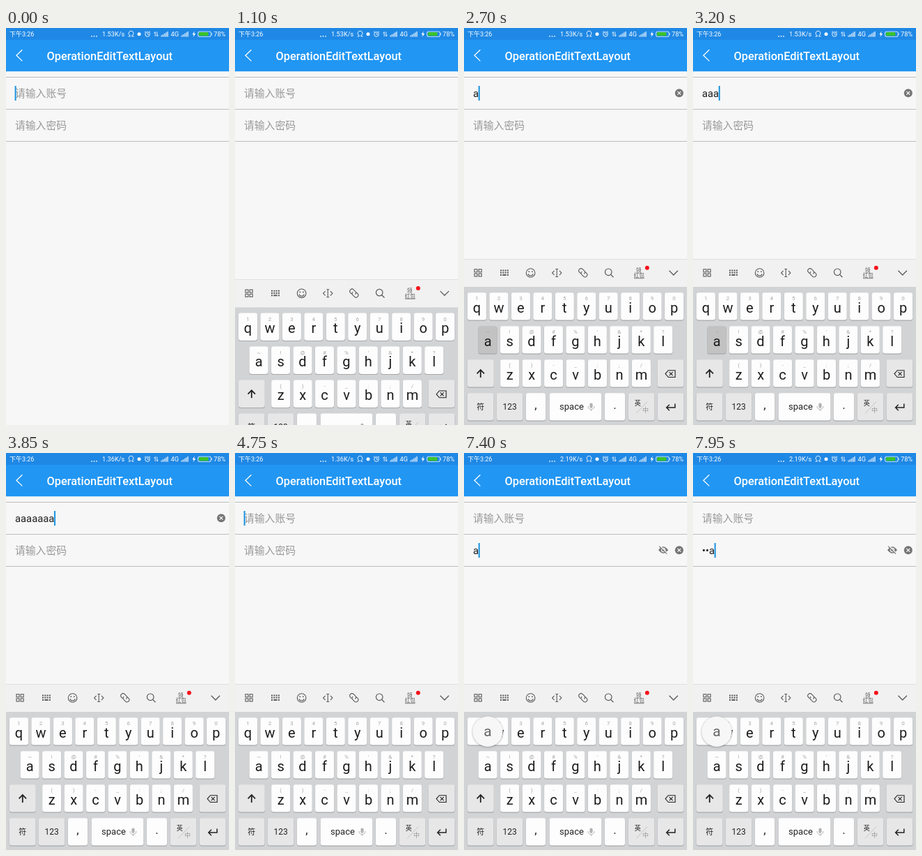
Animation, 320 px wide and 569 px high, one loop 8 s. Source, as an HTML page with a canvas:

```html
<!DOCTYPE html>
<html lang="zh">
<head>
<meta charset="utf-8">
<title>OperationEditTextLayout</title>
<style>
  html, body { margin: 0; width: 100%; height: 100%; overflow: hidden; background: #f7f7f7; }
  canvas { display: block; width: 320px; height: 569px; }
</style>
</head>
<body>
<canvas id="stage"></canvas>
<script>
const W = 320, H = 569, LOOP = 8000;
const canvas = document.getElementById('stage');
const ratio = window.devicePixelRatio || 1;
canvas.width = Math.round(W * ratio);
canvas.height = Math.round(H * ratio);
const ctx = canvas.getContext('2d');

const LATIN = 'Roboto, "Noto Sans CJK SC", "Noto Sans CJK", sans-serif';
const BLUE = '#2196f3', INK = '#222', ICON = '#5a5a5a';

// Timeline in ms
const accountTaps = [2500, 2750, 3000, 3250, 3400, 3600, 3750, 3950];
const passwordTaps = [7400, 7650, 7950];
const taps = [...accountTaps, ...passwordTaps];
const CLEARED = 4750, PASSWORD_FOCUS = 5500;
const cursorOn = [[0, 100], [600, 1100], [1600, 2100], [2500, 4500], [4750, 5300],
                  [5500, 6050], [6550, 7100], [7400, LOOP]];
const within = (t, from, to) => t >= from && t < to;
const countBefore = (times, t) => times.filter(time => time <= t).length;

function text(str, x, y, size, color, align = 'left', weight = 400) {
  ctx.font = `${weight} ${size}px ${LATIN}`;
  ctx.textAlign = align;
  ctx.fillStyle = color;
  ctx.fillText(str, x, y);
}

function rect(x, y, w, h, color) {
  ctx.fillStyle = color;
  ctx.fillRect(x, y, w, h);
}

function rounded(x, y, w, h, r, color) {
  ctx.beginPath();
  ctx.roundRect(x, y, w, h, r);
  ctx.fillStyle = color;
  ctx.fill();
}

function disc(x, y, r, color) {
  ctx.beginPath();
  ctx.arc(x, y, r, 0, 7);
  ctx.fillStyle = color;
  ctx.fill();
}

function stroke(path, color, width = 1) {
  ctx.strokeStyle = color;
  ctx.lineWidth = width;
  ctx.stroke(new Path2D(path));
}

const fill = (path, color) => {
  ctx.fillStyle = color;
  ctx.fill(new Path2D(path));
};

const ring = (x, y, r, color, width = 1) =>
  stroke(`M${x - r} ${y}a${r} ${r} 0 1 0 ${2 * r} 0a${r} ${r} 0 1 0 ${-2 * r} 0`, color, width);

function signal(x) {
  for (let i = 0; i < 5; i++) rect(x + i * 2.2, 10.6 - i * 1.4, 1.3, 2 + i * 1.4, '#e6f2fd');
}

function drawHeader(t) {
  rect(0, 0, W, 62.2, BLUE);
  rect(0, 0, W, 17, '#1f88e5');
  const speed = t < 3500 ? '1.53' : t < 7100 ? '1.36' : '2.19';
  text('下午3:26', 5, 12.3, 9, '#fff');
  for (const x of [123, 126.5, 130]) disc(x, 11.8, 0.9, '#fff');
  text(speed + 'K/s', 138, 12.3, 9.2, '#fff');
  stroke('M175.5 12H178.2V10.8A3.4 3.4 0 1 1 180.8 10.8V12H183.5', '#fff', 0.9);
  disc(191, 8.7, 2.5, '#fff');
  ring(203, 9, 3.3, '#fff', 0.9);
  stroke('M203 7V9.2H205M198.8 6.2L200.8 4.7M207.2 6.2L205.2 4.7', '#fff', 0.8);
  stroke('M214.2 12V5.5L212.4 7.6M216.8 5.5V12L218.6 9.9', '#fff', 0.9);
  signal(222.5);
  text('4G', 236.5, 12.3, 9.2, '#fff');
  signal(251.5);
  fill('M270.8 4.5L267.3 9.2H269.4L268.4 13L272.2 8H269.9Z', '#fff');
  rounded(275.2, 4.7, 19.4, 8, 2.8, '#e4f2fd');
  rounded(276, 5.5, 17.8, 6.4, 2.2, '#1f88e5');
  rounded(276.8, 6.1, 13.6, 5.2, 1.6, '#3cc22c');
  rect(294.6, 7.2, 0.9, 3, '#e4f2fd');
  text('78%', 298, 12.3, 9.2, '#fff');
  stroke('M23.4 31.2L15 39.3L23.4 47.4', '#fff', 1.3);
  text('OperationEditTextLayout', 58.5, 45.5, 16.35, '#fff', 'left', 500);
}

function drawClear(y) {
  disc(308.8, y, 6, '#757575');
  stroke(`M306.4 ${y - 2.4}l4.8 4.8m0 -4.8l-4.8 4.8`, '#fff', 1.2);
}

function drawHiddenEye(y) {
  ctx.save();
  ctx.translate(286, y);
  fill('M-7 0Q0 -9.4 7 0Q0 9.4 -7 0Z', '#777');
  disc(0, 0, 3.2, '#f7f7f7');
  disc(0, 0, 2, '#777');
  stroke('M-5 -6L6 5', '#f7f7f7', 1.6);
  stroke('M-6 -5.4L5.2 5.6', '#777', 1.2);
  ctx.restore();
}

function drawField(top, hint, value, cursor) {
  const baseline = top + 28.6;
  if (value) text(value, 13, baseline, 14.8, INK);
  else text(hint, 13, baseline + 0.6, 14.8, '#999');
  if (!cursor) return;
  ctx.font = `400 14.8px ${LATIN}`;
  rect(12.6 + ctx.measureText(value).width, top + 13, 2.1, 21, '#2196e0');
}

function drawForm(t) {
  for (const y of [70, 116, 162]) rect(0, y, W, 1, '#bdbdbd');
  const blink = cursorOn.some(([from, to]) => within(t, from, to));
  const account = t < CLEARED ? 'a'.repeat(countBefore(accountTaps, t)) : '';
  const typed = countBefore(passwordTaps, t);
  const password = typed ? '•'.repeat(typed - 1) + 'a' : '';
  drawField(70, '请输入账号', account, blink && t < PASSWORD_FOCUS);
  drawField(116, '请输入密码', password, blink && t >= PASSWORD_FOCUS);
  if (account) drawClear(93.3);
  if (password) {
    drawHiddenEye(139);
    drawClear(139.2);
  }
}

function drawTools() {
  rect(0, 331, W, 40, '#f1f1f1');
  rect(0, 331, W, 0.8, '#dcdcdc');
  ctx.strokeStyle = ICON;
  ctx.lineWidth = 1.1;
  for (const x of [15, 21.2])
    for (const y of [345.8, 352]) ctx.strokeRect(x, y, 4, 4);
  for (let row = 0; row < 2; row++)
    for (let col = 0; col < 4; col++) rect(52 + col * 3.3, 346.5 + row * 3.2, 2, 2, ICON);
  rect(52, 353, 2, 2, ICON);
  rect(55.3, 353, 5.3, 2, ICON);
  rect(61.9, 353, 2, 2, ICON);
  ring(95.6, 351, 6.3, ICON, 1.1);
  disc(93.3, 349.2, 0.9, ICON);
  disc(97.9, 349.2, 0.9, ICON);
  stroke('M92.1 352.3a3.6 3.6 0 0 0 7 0', ICON, 1.1);
  stroke('M129.6 347.8L126.6 351L129.6 354.2M136.9 347.8L139.9 351L136.9 354.2'
    + 'M133.2 345.5V356.5M131.3 345.5H135.2M131.3 356.5H135.2', ICON, 1.1);
  ctx.save();
  ctx.translate(170.8, 350.8);
  ctx.rotate(Math.PI / 4);
  for (let half = 0; half < 2; half++) {
    stroke('M-1.6 3.2H-4a3.2 3.2 0 0 1 0 -6.4H-0.8a3.2 3.2 0 0 1 3.2 3.2', ICON, 1.1);
    ctx.rotate(Math.PI);
  }
  ctx.restore();
  ring(207.2, 349.8, 4.8, ICON, 1.2);
  stroke('M210.6 353.4L214.4 357.2', ICON, 1.3);
  text('领', 250.5, 350, 8, ICON, 'center');
  text('红包', 251.3, 357.3, 7.5, ICON, 'center');
  rect(244, 358.4, 14.5, 0.8, ICON);
  disc(262.8, 343.8, 3, '#f5131a');
  stroke('M294.5 347.8L300.7 354L306.9 347.8', ICON, 1.3);
}

function drawKey(x, y, w, color = '#fdfdfd') {
  rounded(x - 0.2, y + 0.4, w + 0.4, 40, 3.5, '#a8a9ab');
  rounded(x, y, w, 39.3, 3.3, color);
}

function drawLetters(letters, marks, left, top, pressed) {
  [...letters].forEach((letter, i) => {
    const x = left + i * 31.45;
    const down = letter === 'a' && pressed;
    drawKey(x, top, 27, down ? '#c2c2c2' : undefined);
    text(marks[i], x + 13.5, top + 11, 8, '#a8a8a8', 'center');
    text(letter, x + 13.5, top + 28.6, 20, '#1c1c1c', 'center');
  });
}

function drawFunctionKeys() {
  const soft = '#e7e7e8';
  drawKey(5, 475.3, 37.8, soft);
  stroke('M23.8 501V490.5M18.6 495.4L23.8 490L29 495.4', INK, 1.8);
  drawKey(277.5, 475.3, 37.8, soft);
  stroke('M293.2 490.7H303V500.5H293.2L289 495.6Z', INK, 1.1);
  stroke('M294.6 493.1L299.6 498.1M299.6 493.1L294.6 498.1', INK, 1.1);

  const y = 523.3;
  drawKey(5, y, 37.5, soft);
  text('符', 23.7, y + 23.7, 11, INK, 'center');
  drawKey(47, y, 37.3, soft);
  text('123', 65.6, y + 23.3, 12, INK, 'center');
  drawKey(89, y, 28);
  text(',', 103, y + 23, 17, INK, 'center');
  drawKey(122.7, y, 74.6);
  text('space', 154.5, y + 23.7, 13, INK, 'center');
  rounded(180.4, 537.5, 4.2, 7.4, 2.1, '#b3b3b3');
  stroke('M178 542a4.5 4.8 0 0 0 9 0M182.5 546.8V549', '#b3b3b3', 1);
  drawKey(202, y, 29);
  text('.', 216.5, y + 23, 17, INK, 'center');
  drawKey(236, y, 37.3, soft);
  text('英', 249.2, y + 18, 9, INK, 'center');
  text('中', 260.5, y + 28, 9, '#999', 'center');
  stroke('M247 552.5L263 535.5', '#bbb', 0.8);
  drawKey(278, y, 37.3, soft);
  stroke('M302.8 538.5V544H290.8M294.8 539.8L290.6 544L294.8 548.2', INK, 1.5);
}

function drawBubble() {
  ctx.save();
  ctx.shadowColor = 'rgba(0,0,0,.35)';
  ctx.shadowBlur = 2.5 * ratio;
  ctx.shadowOffsetY = 0.6 * ratio;
  disc(34, 399.3, 21.7, '#f7f7f7');
  ctx.restore();
  text('a', 34, 405.5, 21, '#666', 'center');
}

function drawKeyboard(t) {
  const progress = Math.min(1, Math.max(0, (t - 900) / 400));
  if (!progress) return;
  const pressed = taps.some(tap => within(t, tap - 60, tap));
  const bubble = taps.some(tap => within(t, tap, tap + 100));
  ctx.save();
  ctx.translate(0, 238 * (1 - progress) ** 3);
  rect(0, 370, W, 199, '#d2d3d5');
  drawTools();
  drawLetters('qwertyuiop', '1234567890', 5, 379.3, pressed);
  drawLetters('asdfghjkl', "~!@#%'&*?", 20.6, 427.3, pressed);
  drawLetters('zxcvbnm', '()-_:;/', 52.2, 475.3, pressed);
  drawFunctionKeys();
  if (bubble) drawBubble();
  ctx.restore();
}

function draw() {
  const t = performance.now() % LOOP;
  ctx.setTransform(ratio, 0, 0, ratio, 0, 0);
  rect(0, 0, W, H, '#f7f7f7');
  drawHeader(t);
  drawForm(t);
  drawKeyboard(t);
  requestAnimationFrame(draw);
}
draw();
</script>
</body>
</html>
```
